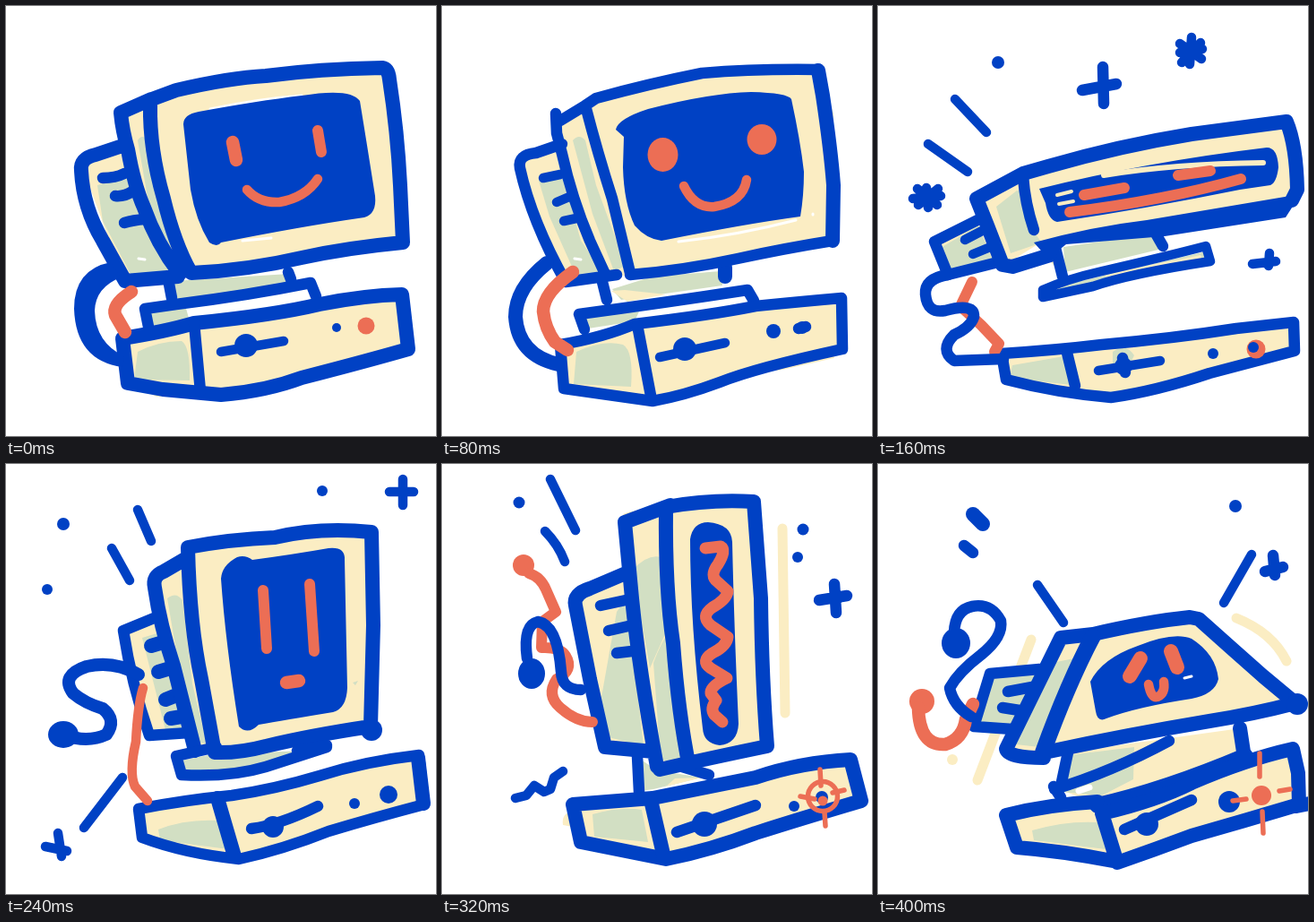
Write an HTML page that moves like this. It is 480 px wide and 480 px high and loops after 480 ms.

```html
<!DOCTYPE html>
<html lang="en">
<head>
<meta charset="utf-8">
<title>Dancing computer</title>
<style>
  html, body { margin: 0; width: 100%; height: 100%; overflow: hidden; background: #fff; }
  svg { display: block; width: 100%; height: 100%; }
  .pose { display: none; fill: none; stroke-linecap: round; stroke-linejoin: round; }
  .on { display: block; }
  .cream { fill: #fbedc3; }
  .green { fill: #d2dfc3; }
  .blue { fill: #0041c4; }
  .coral { fill: #ec6e55; }
  .ink { stroke: #0041c4; stroke-width: 12.5; }
  .pen { stroke: #ec6e55; stroke-width: 12; }
  .chalk { stroke: #fbedc3; stroke-width: 11; }
  .gap { stroke: #fff; stroke-width: 3; }
  .thick { stroke-width: 16; }
  .pen.thick { stroke-width: 14.5; }
  .thin { stroke-width: 10.5; }
  .tick { stroke-width: 5.5; }
</style>
</head>
<body>
<svg viewBox="0 0 480 480">
  <!-- smiling -->
  <g class="pose">
    <path class="cream" d="M163 104L290 78 424 70 443 264 207 297 190 300 132 307 84 176 130 158 128 119ZM130 371L210 353 443 322 449 383 240 435 168 436 136 421Z"/>
    <path class="green" d="M147 150Q152 142 158 150L178 220 205 292 192 295 160 225ZM102 200L134 192 150 225 160 250 184 297 140 301 108 240ZM187 307L316 299 319 308 190 330ZM158 342L200 334 205 352 163 358ZM147 386Q170 374 196 374 206 380 205 418L143 417Z"/>
    <path class="gap" d="M228 115Q280 104 330 100M264 262L296 259M148 282L155 283"/>
    <path class="ink" d="M108 192Q122 192 132 187M122 212Q132 213 141 207M132 242Q142 239 155 238M181 305L185 326M315 297L318 305M155 338L190 333Q270 323 340 309L346 324M155 338L159 358"/>
    <path class="ink thick" d="M163 104L190 94Q250 80 290 78 350 70 420 69 427 70 428 82 437 140 440 200L443 264Q380 270 330 281 270 295 207 298M161 110Q160 160 176 215 188 265 206 297M162 104L128 119Q130 140 136 160 143 200 154 225 168 265 194 299M130 156L100 166Q82 170 84 184 86 225 108 262L133 307 192 302"/>
    <path class="ink thick" d="M130 371Q180 363 210 354 300 345 350 333 400 323 442 322L449 383Q400 397 330 415 290 430 240 434L175 428 136 421Z"/>
    <path class="ink" d="M210 354L217 430"/>
    <path class="ink thin" d="M240 386L310 374"/>
    <path class="blue" d="M117 286Q76 294 76 338 78 396 130 403L132 391Q100 376 99 340 100 314 128 303ZM198 132Q198 121 215 118 280 106 330 100 385 91 395 106 403 155 412 212 414 232 400 236 330 246 240 264 236 270 227 264 212 240 206 205Z"/>
    <circle class="blue" cx="268" cy="379" r="13"/>
    <circle class="blue" cx="369" cy="359" r="5"/>
    <circle class="coral" cx="402" cy="357" r="9.5"/>
    <path class="pen thick" d="M253 152L257 172M140 319Q118 333 122 345L133 364"/>
    <path class="pen" d="M348 139L352 163"/>
    <path class="pen thin" d="M269 205Q282 220 305 219 334 214 348 193"/>
  </g>

  <!-- round eyes -->
  <g class="pose">
    <path class="cream" d="M160 110L290 76 420 72 437 120 436 262 210 300 138 308 85 172 132 154 128 125ZM132 378L215 356 446 326 447 383 235 441 136 427ZM430 105Q440 120 435 150L428 150ZM330 412L436 385 438 393 380 406Z"/>
    <path class="green" d="M146 150Q153 142 160 150L172 200 205 290 192 296 168 232ZM108 195L135 191 155 262 180 298 150 302 120 235ZM190 316L235 302 311 296 313 312 200 328ZM160 347L220 341 215 352 163 360ZM150 386Q180 372 202 378 214 385 211 425L147 422Z"/>
    <path class="cream" d="M189 318L204 317 250 322 207 330Z"/>
    <path class="gap" d="M264 263Q330 256 395 239M414 232V233M148 282L155 283"/>
    <path class="ink thin" d="M113 192L132 188M128 219L142 213M136 240L150 237M243 392L316 376"/>
    <path class="ink" d="M178 304L184 328M153 344Q250 331 341 317L348 329M153 344L159 361"/>
    <path class="ink thick" d="M316 292V302"/>
    <path class="ink" d="M160 111L172 103Q230 87 290 75 350 70 420 71L425 100Q434 160 437 200L436 262Q380 271 330 282 270 295 210 300M160 111Q174 165 190 215 202 265 210 298M160 111L132 128M127 120L128 142 134 165Q145 215 165 262L182 299M134 154L105 164Q84 166 87 181 100 240 138 308L195 300"/>
    <path class="ink thick" d="M420 72L425 100Q434 160 437 200L436 262"/>
    <path class="ink" d="M132 378Q180 370 215 355 300 345 350 335 400 330 446 326L447 383Q350 404 310 420 270 435 235 441L136 427Z"/>
    <path class="ink" d="M218 356L234 440M398 360L406 358"/>
    <path class="ink thick" d="M117 287Q82 315 82 347 85 390 130 400"/>
    <path class="blue" d="M194 138Q196 126 230 115 300 97 345 96 386 97 390 104 400 150 404 185 404 212 400 235 340 243 245 262 228 260 215 245 203 220 202 180L203 146Z"/>
    <circle class="blue" cx="271" cy="383" r="13"/>
    <circle class="blue" cx="370" cy="363" r="8"/>
    <circle class="blue" cx="402" cy="359" r="7"/>
    <ellipse class="coral" cx="246.500" cy="166" rx="17" ry="19"/>
    <ellipse class="coral" cx="357" cy="149" rx="16.500" ry="17"/>
    <path class="pen thin" d="M270 201Q282 226 304 224 336 219 340 194"/>
    <path class="pen thick" d="M146 297Q113 320 113 341 115 360 126 375L140 384"/>
  </g>

  <!-- squashed -->
  <g class="pose">
    <path class="cream" d="M162 190L280 155 456 128 468 205 460 217 180 265 140 290 120 245 109 215ZM63 263L110 240 130 285 78 300ZM138 388L250 378 464 353 465 385 260 437 143 417ZM188 281L198 280 199 292Z"/>
    <path class="green" d="M132 224L155 206 163 208 172 250 183 264 148 276ZM70 270L112 245 128 284 82 300ZM207 269L308 254 313 272 209 297ZM184 317L366 274 367 284 184 325ZM150 401L208 391 215 423 147 415ZM262 386Q277 376 286 390L280 402 262 404Z"/>
    <path class="cream" d="M250 300L360 278 362 284 260 304Z"/>
    <path class="ink thin" d="M97 261L118 250M106 277L123 270M246 407L315 396"/>
    <path class="ink" d="M198 270L206 302M310 254L318 268M162 190Q164 220 174 250M63 263L113 238M63 263L78 300 130 287"/>
    <path class="ink thick" d="M110 215L162 187 190 179Q270 156 350 143L456 129Q467 155 468 205L462 217M110 215L122 245 139 289 150 291 192 278"/>
    <path class="blue" d="M174 264Q240 246 300 239L460 212 464 222 455 236 320 257 210 266 190 282Z"/>
    <path class="ink thin" d="M184 317Q210 305 250 296 320 280 366 268L371 285Q280 299 240 313L184 325Z"/>
    <path class="ink" d="M138 388Q200 384 250 378 330 371 400 360L464 353 465 385Q400 402 370 410 310 430 260 437 200 432 143 417Z"/>
    <path class="ink" d="M211 387L220 424M273 393L276 409"/>
    <path class="blue" d="M180 204Q300 174 434 158 446 158 447 180 445 197 438 200L404 205Q300 226 200 241 190 239 187 220Z"/>
    <path class="chalk" style="stroke-width:6" d="M252 189Q330 176 430 175"/>
    <path class="chalk" style="stroke-width:4" d="M202 221L218 218M200 211L216 207"/>
    <path class="pen" d="M230 211L275 203M335 189L371 184M214 230Q320 217 405 193"/>
    <circle class="blue" cx="274" cy="402" r="10"/>
    <circle class="blue" cx="374" cy="388" r="6"/>
    <circle class="coral" cx="422" cy="383" r="10.5"/>
    <circle class="blue" cx="419" cy="381" r="6"/>
    <path class="pen" d="M105 308L92 335 115 356 135 377 130 386"/>
    <path class="ink" d="M78 300Q52 304 53 322 55 344 75 340 108 331 107 347 103 359 85 367 68 384 85 396L140 394"/>
    <circle class="blue" cx="134" cy="63" r="7"/>
    <path class="ink" d="M251 68L252 109M228 94L266 87"/>
    <path class="ink thin" d="M86 104L121 141M56 154L100 185M350 35L348 65M337 42L361 59M360 41L339 63M337 52L362 48M54 203L56 225M44 204L66 222M67 204L45 222M39 215L70 212M437 276L436 290M418 288L444 285"/>
  </g>

  <!-- surprised -->
  <g class="pose">
    <path class="cream" d="M203 93L408 76 408 293 233 322 210 318 200 300 160 303 131 186 170 168 166 128ZM148 385L240 373 460 326 467 380 260 440 150 415Z"/>
    <path class="green" d="M180 150Q190 142 197 152L208 245 224 312 208 310 192 220ZM152 194L172 188 198 295 178 297ZM196 331L230 324 335 320 270 338 202 346ZM170 408Q200 396 237 398L248 430 172 420ZM387 244L393 242 390 247Z"/>
    <path class="ink thick" d="M162 203L172 200M170 232L180 229M178 263L188 259M184 284L196 282"/>
    <path class="ink thick" d="M203 93Q250 84 300 82 350 70 408 76L410 180 407 293Q340 303 290 315 260 323 233 322M203 93Q205 180 218 240L233 322M200 106L176 120Q163 125 166 138 172 180 187 225L211 320"/>
    <path class="ink" d="M170 170L131 186Q140 245 160 303L204 300"/>
    <path class="ink" d="M190 326L196 347Q250 350 290 338L358 316M190 326L235 316M325 320L358 314"/>
    <path class="ink" d="M148 385Q200 375 252 370 300 363 350 348 400 332 461 325L467 380Q410 395 360 410 310 430 260 441 200 435 152 417Z"/>
    <path class="ink thick" d="M236 373L255 438M460 328L466 379"/>
    <path class="ink" d="M274 407Q305 403 348 382"/>
    <path class="blue" d="M240 128Q241 113 258 104 267 101 275 107 320 101 360 94 379 92 378 107L381 250Q380 273 365 277 310 286 282 291 270 303 260 293 245 200 240 128Z"/>
    <circle class="blue" cx="408" cy="297" r="12"/>
    <circle class="blue" cx="298" cy="405" r="12"/>
    <circle class="blue" cx="389" cy="379" r="6"/>
    <circle class="blue" cx="427" cy="369" r="10"/>
    <path class="pen" d="M287 141L291 206M339 134L344 209"/>
    <path class="pen thick" d="M313 244L327 242"/>
    <path class="pen thin" d="M153 250Q147 270 145 310 137 345 144 360L158 376"/>
    <path class="ink thick" style="stroke-width:14" d="M148 235Q120 219 90 226 60 236 75 256 88 267 108 273 124 286 112 302 90 312 65 302"/>
    <ellipse class="blue" cx="64" cy="302" rx="17" ry="15"/>
    <circle class="blue" cx="64" cy="67" r="7"/>
    <circle class="blue" cx="46" cy="140" r="6"/>
    <circle class="blue" cx="353" cy="30" r="6"/>
    <path class="ink thin" d="M147 51L162 86M118 94L138 130M130 350L87 406M443 17V46M428 31H455M58 412L62 438M44 427L68 432"/>
  </g>

  <!-- stretched -->
  <g class="pose">
    <path class="cream" d="M250 46L348 42 362 315 243 340 232 322 180 317 148 150 203 120 204 65ZM146 380L235 372 455 330 468 375 250 440 155 422ZM202 56Q215 50 232 53L210 70ZM146 387Q133 390 135 403L151 406Z"/>
    <path class="chalk" d="M380 72L383 278"/>
    <path class="green" d="M213 118Q230 100 244 104L249 190 232 228ZM195 165L206 150 225 315 182 304 178 260ZM236 222Q245 198 252 190L262 300 268 334 244 330ZM222 330L240 342 290 350 236 363 222 365ZM168 391Q200 382 223 386L230 422 170 416Z"/>
    <path class="cream" d="M260 351L290 350 250 360Z"/>
    <path class="ink" d="M177 158L205 152M186 186L208 181M195 211L212 209M218 326L220 366M268 338L298 347"/>
    <path class="ink thick" d="M250 48Q300 39 348 42L356 150Q357 240 363 315 300 328 243 341M250 48Q249 140 258 200 264 280 276 338M255 46L204 65 212 150Q220 230 240 338M205 122L165 139Q146 145 149 158L165 240 182 316 236 321"/>
    <path class="ink thick" d="M146 380L235 373Q300 360 350 350 400 333 456 330L468 376Q400 396 350 412 300 431 250 441L155 422Z"/>
    <path class="ink thick" d="M233 375L248 440"/>
    <path class="ink" d="M262 411L350 381"/>
    <path class="blue" d="M277 84Q280 65 297 65 323 67 324 87 326 180 331 290 330 312 310 314 292 312 291 295 277 180 277 84Z"/>
    <path class="pen" style="stroke-width:13" d="M294 94L311 92Q318 96 308 112 298 125 308 132L319 142Q318 151 302 160 288 170 300 180L319 193Q318 203 302 211 288 220 300 228L318 239Q299 248 300 256L306 264Q299 273 304 280L313 288"/>
    <circle class="blue" cx="293" cy="402" r="14"/>
    <circle class="blue" cx="393" cy="382" r="6"/>
    <circle class="blue" cx="424" cy="372" r="7"/>
    <circle class="coral" cx="425" cy="376" r="5.500"/>
    <circle class="pen tick" cx="425" cy="371" r="16.500"/>
    <path class="pen tick" d="M422 341L423 359M427 389L428 404M400 371L416 374M436 367L449 364"/>
    <circle class="coral" cx="91" cy="113" r="12"/>
    <path class="pen" d="M97 122Q110 126 116 140L127 165 112 176 111 205Q132 204 138 214 148 230 128 240 116 258 132 272 150 288 168 288"/>
    <path class="ink" d="M155 252Q134 252 133 232 129 180 107 176 90 180 95 217"/>
    <ellipse class="blue" cx="100" cy="234" rx="15" ry="17"/>
    <circle class="blue" cx="86" cy="43" r="6.500"/>
    <circle class="blue" cx="403" cy="73" r="6.500"/>
    <circle class="blue" cx="397" cy="104" r="6"/>
    <path class="ink thin" d="M121 17L149 74M115 75Q130 90 137 109M82 373L94 370 103 359 114 366 121 363 125 350 135 343"/>
    <path class="ink" d="M438 134L440 166M421 152L452 147M436 150H442"/>
  </g>

  <!-- leaning back -->
  <g class="pose">
    <path class="chalk" d="M171 196L111 353M400 172Q440 188 456 220"/>
    <circle class="cream" cx="83" cy="330" r="6"/>
    <path class="cream" d="M200 195L245 190 350 172 425 240 465 268 370 288 185 325 143 325ZM125 234L180 228 150 296 106 293ZM210 322L405 295 409 328 245 380 200 362ZM143 392L245 380 463 318 470 380 267 444 155 428Z"/>
    <path class="green" d="M194 222L224 216 180 316 154 313ZM128 240L178 234 150 292 112 290ZM213 325L286 316 285 352 250 370 204 366ZM172 409Q210 398 245 400L254 430 174 420Z"/>
    <path class="ink" d="M145 254L172 249M139 272L158 275M180 229L125 234 107 293 150 296M212 322L205 355M196 360L204 372M197 363Q260 344 325 309"/>
    <path class="ink thick" d="M240 190Q300 176 348 171L358 173 395 206 430 237 466 267Q420 279 370 287 280 302 186 322M240 190L204 194 143 318Q145 328 185 328"/>
    <path class="ink" style="stroke-width:18" d="M240 192Q212 245 184 322M245 381Q320 364 410 326"/>
    <path class="ink thick" d="M404 295L409 328M143 392Q190 380 245 377M143 392L155 428Q205 432 262 443M250 390Q310 376 350 356 410 330 463 318L469 345 470 380Q410 398 350 415 310 430 267 445ZM467 382L482 379"/>
    <path class="ink" d="M275 408L350 375"/>
    <path class="gap" style="stroke-width:7" d="M224 365L236 361"/>
    <path class="blue" d="M237 243Q250 217 290 203 330 187 350 195 377 212 380 240 376 257 350 262 290 271 255 284 245 289 243 276Z"/>
    <path class="gap" d="M342 239L350 237"/>
    <path class="pen" style="stroke-width:16" d="M281 237L293 217M327 209L334 227"/>
    <path class="pen thin" d="M302 246Q305 262 312 260 321 256 319 243"/>
    <circle class="blue" cx="468" cy="268" r="12"/>
    <circle class="blue" cx="300" cy="402" r="13"/>
    <circle class="blue" cx="392" cy="377" r="12"/>
    <circle class="coral" cx="428" cy="370" r="11"/>
    <path class="pen tick" d="M426 323V349M429 388L430 412M396 376L411 374M448 365L460 363"/>
    <circle class="coral" cx="49" cy="265" r="14"/>
    <path class="pen thick" d="M45 272Q46 315 75 313 95 307 98 285L106 268"/>
    <path class="ink" d="M104 282Q84 270 80 250 90 232 115 213 140 193 137 175 126 155 105 159 86 163 85 188"/>
    <ellipse class="blue" cx="87" cy="200" rx="16" ry="17"/>
    <circle class="blue" cx="399" cy="47" r="7"/>
    <path class="ink" d="M96 91L106 99M441 102L443 124M432 120L452 115"/>
    <path class="ink thick" d="M106 56L117 67"/>
    <path class="ink thin" d="M178 135L207 177M417 101L386 155"/>
  </g>
</svg>
<script>
  const HOLD = 80;
  const poses = [...document.querySelectorAll('.pose')];

  function draw(ms) {
    const now = Math.floor(ms / HOLD) % poses.length;
    poses.forEach((pose, i) => pose.classList.toggle('on', i === now));
  }

  const start = performance.now();
  function tick() {
    draw(performance.now() - start);
    requestAnimationFrame(tick);
  }
  tick();
</script>
</body>
</html>
```
